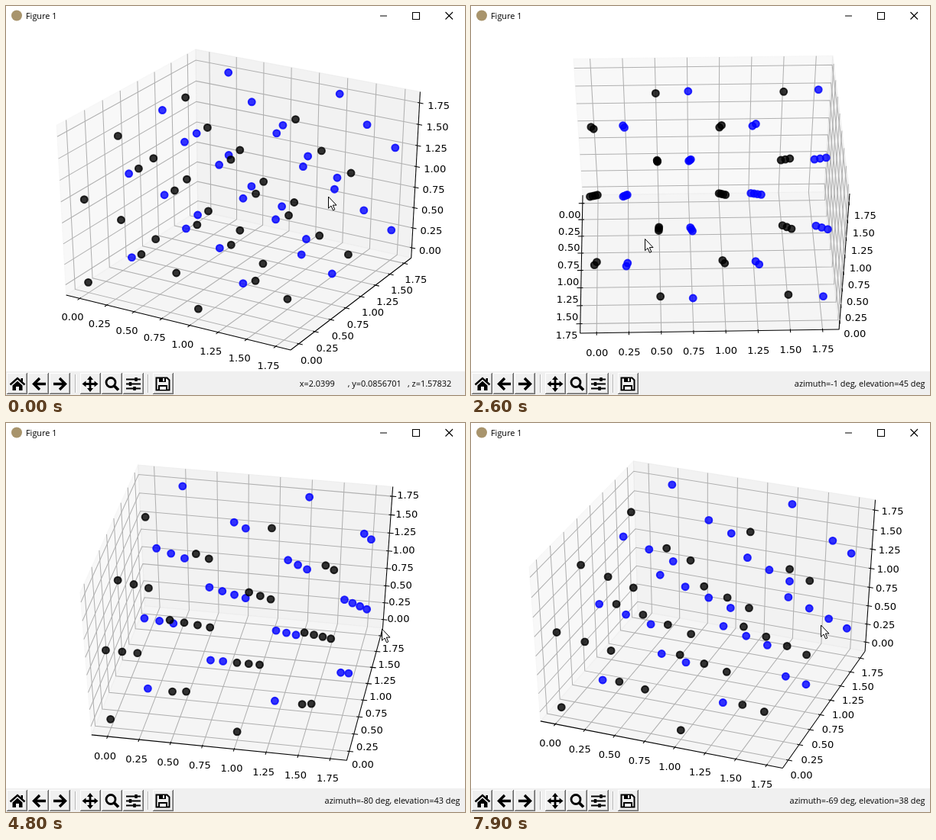
Recreate the animation shown at these times as an HTML page with a canvas. Size 600 px wide and 510 px high, loop 8000 ms.

```html
<!DOCTYPE html>
<html lang="en">
<head>
<meta charset="utf-8">
<title>Figure 1</title>
<style>
  html, body { margin: 0; width: 100%; height: 100%; overflow: hidden; background: #fff; }
  canvas { display: block; }
</style>
</head>
<body>
<canvas id="stage" width="600" height="510"></canvas>
<script>
const ctx = document.getElementById('stage').getContext('2d');
const LOOP = 8000, STEP = 100, LAG = 0.15;
const UI_FONT = '10.9px "Open Sans", "Noto Sans", sans-serif';
const TICK_FONT = '13px "DejaVu Sans", sans-serif';

// Drag path: ms, azimuth, elevation, and how far the pointer leads each angle.
const path = [
  [200, -60, 30, 0, 0],
  [1900, -3.4, 16.4, 2.2, 1.8],
  [2500, -1, 41, -1, 6.5],
  [3200, -10, 72, -6.8, 5.8],
  [4800, -79.7, 43, -1.3, -5],
  [6000, -51.3, 15.1, 2.4, 3.7],
  [7100, -41.4, 37.2, -1.2, 3.2],
  [7900, -69, 38, -1.8, -2]
];

// Cubic Hermite between drag knots; returns value and pointer value.
function along(t, k) {
  const first = path[0], last = path[path.length - 1];
  t = Math.min(Math.max(t, first[0]), last[0]);
  let i = 0;
  while (i < path.length - 2 && t > path[i + 1][0]) i++;
  const a = path[i], b = path[i + 1], h = (b[0] - a[0]) / 1000;
  const s = (t - a[0]) / (b[0] - a[0]);
  const p = a[k], q = b[k], m = a[k + 2] / LAG * h, n = b[k + 2] / LAG * h;
  const c2 = 3 * (q - p) - 2 * m - n, c3 = 2 * (p - q) + m + n;
  const value = p + s * (m + s * (c2 + s * c3));
  const speed = (m + s * (2 * c2 + 3 * s * c3)) / h;
  return [value, value + speed * LAG];
}

// Zincblende lattice, 2 x 2 x 2 cells, in coordinates centred on the axes box.
const unit = v => (v - 0.875) / 1.925;
const dark = [], blue = [];
for (let i = 0; i < 4; i++)
  for (let j = 0; j < 4; j++)
    for (let k = 0; k < 4; k++)
      if ((i + j + k) % 2 === 0) {
        dark.push([i, j, k].map(n => unit(n / 2)));
        blue.push([i, j, k].map(n => unit(n / 2 + 0.25)));
      }
const ticks = [0, 1, 2, 3, 4, 5, 6, 7].map(n => n / 4);

const EDGE = 0.5 + 1 / 48, DELTA = 1 / 12, LABEL_GAP = 0.057;
const axes = [
  { cross: 1, tickDir: 1, pane: 'rgba(242,242,242,.5)' },
  { cross: 0, tickDir: 0, pane: 'rgba(230,230,230,.5)' },
  { cross: 0, tickDir: 0, pane: 'rgba(236,236,236,.5)' }
];

function camera(az, el) {
  const r = Math.PI / 180;
  const ca = Math.cos(az * r), sa = Math.sin(az * r);
  const ce = Math.cos(el * r), se = Math.sin(el * r);
  const eye = [ce * ca, ce * sa, se];
  const project = ([x, y, z]) => {
    const d = 10 - (eye[0] * x + eye[1] * y + eye[2] * z);
    return [
      307.8 + 3252 * (ca * y - sa * x) / d,
      247 - 2439 * (ce * z - se * (ca * x + sa * y)) / d,
      d
    ];
  };
  return { eye, project };
}

const put = (p, i, v) => { const q = p.slice(); q[i] = v; return q; };

function plot(az, el) {
  const { eye, project } = camera(az, el);
  const back = eye.map(c => c < 0 ? EDGE : -EDGE);
  const trace = pts => {
    ctx.beginPath();
    pts.forEach(p => { const [x, y] = project(p); ctx.lineTo(x, y); });
  };
  const line = (pts, color) => {
    trace(pts);
    ctx.strokeStyle = color;
    ctx.stroke();
  };
  ctx.lineWidth = 1.04;

  axes.forEach((ax, i) => {
    const a = (i + 1) % 3, b = (i + 2) % 3;
    const p = put(back, a, -back[a]);
    trace([back, p, put(p, b, -back[b]), put(back, b, -back[b])]);
    ctx.closePath();
    ctx.fillStyle = ctx.strokeStyle = ax.pane;
    ctx.fill();
    ctx.stroke();
  });

  ctx.font = TICK_FONT;
  ctx.textAlign = 'center';
  axes.forEach((ax, i) => {
    const a = (i + 1) % 3, b = (i + 2) % 3, dir = ax.tickDir;
    const edge = put(back, ax.cross, -back[ax.cross]);
    line([put(edge, i, -EDGE), put(edge, i, EDGE)], '#000');
    for (const v of ticks) {
      const p = put(back, i, unit(v));
      line([put(p, a, -back[a]), p, put(p, b, -back[b])], '#b0b0b0');
    }
    const sign = Math.sign(back[dir]);
    for (const v of ticks) {
      const p = put(edge, i, unit(v));
      line([put(p, dir, p[dir] + 0.1 * sign * DELTA),
            put(p, dir, p[dir] - 0.2 * sign * DELTA)], '#000');
      const at = p.map((c, n) => n === i ? c : c + Math.sign(c) * LABEL_GAP);
      const [x, y] = project(at);
      ctx.fillStyle = '#000';
      ctx.fillText(v.toFixed(2), x, y + 10.3);
    }
  });

  ctx.lineWidth = 1.9;
  for (const [pts, color] of [[blue, 'rgba(0,0,255,.8)'], [dark, 'rgba(0,0,0,.8)']]) {
    ctx.fillStyle = ctx.strokeStyle = color;
    for (const [x, y] of pts.map(project).sort((p, q) => q[2] - p[2])) {
      ctx.beginPath();
      ctx.arc(x, y, 4.5, 0, 7);
      ctx.fill();
      ctx.stroke();
    }
  }
}

function rect(color, x, y, w, h) {
  ctx.fillStyle = color;
  ctx.fillRect(x, y, w, h);
}
function stroke(d, width, color = '#000') {
  ctx.lineWidth = width;
  ctx.strokeStyle = color;
  ctx.stroke(new Path2D(d));
}
function fill(d, color = '#000') {
  ctx.fillStyle = color;
  ctx.fill(new Path2D(d));
}

function titleBar() {
  rect('#fff', 0, 0, 600, 26);
  ctx.fillStyle = '#a8946c';
  ctx.beginPath();
  ctx.arc(14, 12.5, 7, 0, 7);
  ctx.fill();
  ctx.font = UI_FONT;
  ctx.textAlign = 'left';
  ctx.fillStyle = '#000';
  ctx.fillText('Figure 1', 26, 17);
  stroke('M489 13H498M531.5 8.5H540.5V17.5H531.5ZM574.5 8L584 17.5M584 8L574.5 17.5', 1.1);
}

function toolbar(status) {
  rect('#f0f0f0', 0, 479, 600, 31);
  for (const x of [1, 29, 57, 97, 125, 153, 192]) {
    rect('#fff', x, 481, 27, 27);
    rect('#696969', x + 26, 481, 1, 28);
    rect('#696969', x, 508, 27, 1);
    rect('#a0a0a0', x + 25, 482, 1, 26);
    rect('#a0a0a0', x + 1, 507, 25, 1);
    rect('#f0f0f0', x + 1, 482, 24, 25);
  }
  for (const x of [90, 185]) {
    rect('#b4b4b4', x, 483, 1, 24);
    rect('#fff', x + 1, 483, 1, 24);
  }
  // home, back, forward
  stroke('M5.5 496.5L15 488L24.5 496.5', 2.4);
  fill('M8.5 497.5L15 491.7L21.5 497.5V504H17V499H13V504H8.5ZM19.5 488H22V493L19.5 491Z');
  stroke('M52 495.5H37M44 488L36.5 495.5L44 503', 3.4);
  stroke('M62 495.5H77M70 488L77.5 495.5L70 503', 3.4);
  // pan, zoom, sliders, save
  stroke('M103 495.5H117M110 488.5V502.5', 2.8);
  fill('M110 485L114 490H106ZM110 506L114 501H106ZM99.5 495.5L104.5 491.5V499.5ZM120.5 495.5L115.5 491.5V499.5Z');
  stroke('M143 493.5A6 6 0 1 1 131 493.5A6 6 0 1 1 143 493.5', 2.8);
  stroke('M141.5 498L147 503.5', 3.8);
  stroke('M157 489.5H176M157 495.5H176M157 501.5H176', 2);
  stroke('M170 487V492M162.5 493V498M168 499V504', 3.4);
  stroke('M196.5 487.5H210.5L213.5 490.5V503.5H196.5Z', 2);
  fill('M200 487H209V493H200ZM199 497H211V504H199Z');
  rect('#f0f0f0', 205, 488, 2, 4);
  rect('#f0f0f0', 201, 499, 8, 4);

  ctx.font = UI_FONT;
  ctx.textAlign = 'right';
  ctx.fillStyle = '#000';
  ctx.fillText(status, 593.5, 499);
}

function pointer(x, y) {
  ctx.save();
  ctx.translate(x + 0.5, y);
  const arrow = 'M0 0V15.2L3.5 12L6 17.8L8.3 16.8L5.8 11.1H10.5Z';
  fill(arrow, '#fff');
  stroke(arrow, 1);
  ctx.restore();
}

function draw(t) {
  const [az, aimAz] = along(t, 1), [el, aimEl] = along(t, 2);
  rect('#fff', 0, 0, 600, 510);
  plot(az, el);
  titleBar();
  toolbar(t < 300
    ? 'x=2.0399      , y=0.0856701   , z=1.57832    '
    : `azimuth=${Math.round(az)} deg, elevation=${Math.round(el)} deg`);
  pointer(421 - (aimAz + 60) / 0.3, 250 + (aimEl - 30) / 0.4);
}

const start = performance.now();
function tick() {
  const t = Math.max(0, performance.now() - start) % LOOP;
  draw(Math.floor(t / STEP) * STEP);
  requestAnimationFrame(tick);
}
tick();
</script>
</body>
</html>
```
